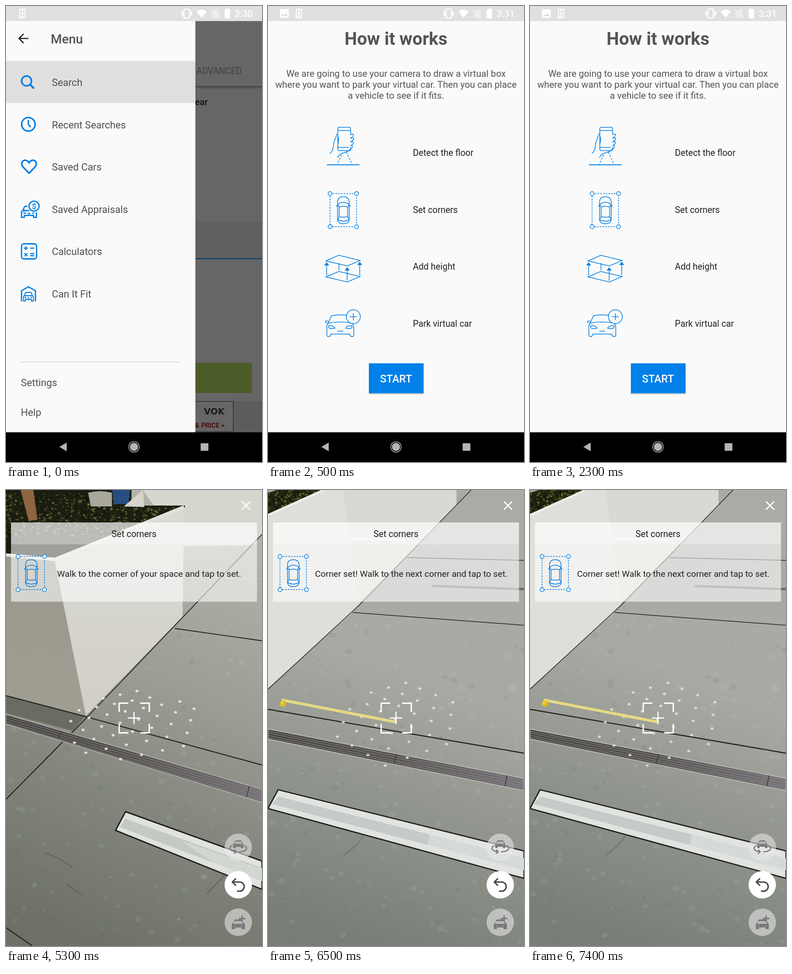
An HTML page for the animation above (8000 ms loop, 561 by 998 pixels).

```html
<!DOCTYPE html>
<html lang="en">
<head>
<meta charset="utf-8">
<title>Can It Fit</title>
<style>
html, body { margin: 0; height: 100%; overflow: hidden; background: #fafafa; }
svg { display: block; width: 100vw; height: 100vh; font-family: Roboto, sans-serif; }
.scene { display: none; }
.line { fill: none; stroke: #007ee5; }
.menu { font-size: 21.8px; fill: #505050; }
.body { font-size: 20.26px; fill: #555; text-anchor: middle; }
.step { font-size: 19.4px; fill: #222; }
.mid { text-anchor: middle; }
.clock { font-size: 20.2px; font-weight: 500; fill: #fff; }
.joint { fill: none; stroke: #22231f; }
</style>
</head>
<body>
<svg viewBox="0 0 561 998">
<defs>
  <linearGradient id="floorA" x1=".6" y1="0" x2=".35" y2="1">
    <stop offset="0" stop-color="#b3b4ac"/><stop offset=".4" stop-color="#9b9d94"/>
    <stop offset=".65" stop-color="#84887e"/><stop offset="1" stop-color="#6d7168"/>
  </linearGradient>
  <linearGradient id="floorB" x1=".6" y1="0" x2=".4" y2="1">
    <stop offset="0" stop-color="#a9aba5"/><stop offset=".4" stop-color="#a7aaa2"/>
    <stop offset=".65" stop-color="#939790"/><stop offset="1" stop-color="#787e76"/>
  </linearGradient>
  <linearGradient id="wall" x1="0" y1="0" x2="0" y2="1">
    <stop offset="0" stop-color="#dbdad4"/><stop offset="1" stop-color="#d0cec7"/>
  </linearGradient>
  <linearGradient id="shadedWall" x1="0" y1="0" x2="0" y2="1">
    <stop offset="0" stop-color="#9a988d"/><stop offset="1" stop-color="#a09e92"/>
  </linearGradient>
  <linearGradient id="grate">
    <stop offset="0" stop-color="#474543"/><stop offset=".45" stop-color="#54514f"/><stop offset="1" stop-color="#77737a"/>
  </linearGradient>
  <linearGradient id="shade" x1="0" y1="0" x2="0" y2="1">
    <stop offset="0" stop-color="#444"/><stop offset="1" stop-color="#666"/>
  </linearGradient>
  <clipPath id="hedgeA"><path d="M0 0H275V34L392 34V38L107 148L0 139Z"/></clipPath>
  <clipPath id="hedgeB"><path d="M0 6L20 0H119L0 54Z"/></clipPath>
  <clipPath id="page"><path d="M415 33H561V933H415Z"/></clipPath>

  <path id="car" d="M4 10L7 3Q8 1 10 1H24Q26 1 27 3L30 10Q33 11 33 14V24H27V20H7V24H1V14Q1 11 4 10H30M5 14l5 2M29 14l-5 2M14 16H20"/>

  <path id="download" d="M31 6H41Q43 6 43 8V25Q43 27 41 27H31Q29 27 29 25V8Q29 6 31 6ZM31 9V24H41V9ZM34.7 10.5H37.3V15.5H40L36 20L32 15.5H34.7ZM32 21.5H40V23H32Z" fill="#fff" fill-rule="evenodd"/>

  <g id="system">
    <path d="M0 0H561V33H0Z" fill="#e0e0e0"/>
    <g fill="none" stroke="#fff" stroke-width="2">
      <rect x="390" y="7" width="12" height="19" rx="2" stroke-width="2.4"/>
      <path d="M387 11V22M385 13.500V19.500M405 11V22M407 13.500V19.500"/>
    </g>
    <path d="M417.500 12Q428.500 3.500 440 12L428.700 26Z" fill="#fff"/>
    <path d="M456 8H466V26H450V14Z" fill="#ebebeb"/>
    <path d="M449 8L467 26" stroke="#f4f4f4" stroke-width="1.500"/>
    <path d="M482 7V5.500H488V7H491V27H479V7Z" fill="#fff"/>
    <path d="M0 933H561V998H0Z"/>
    <g fill="#b4b4b4">
      <path d="M117 965L133 955.500V974.500Z"/>
      <circle cx="280.500" cy="965" r="9"/>
      <circle cx="280.500" cy="965" r="11.500" fill="none" stroke="#b4b4b4" stroke-width="1.500"/>
      <rect x="426.500" y="957" width="17" height="16.500" rx="1"/>
    </g>
  </g>

  <g id="corners" class="line" stroke-width="1.500">
    <path d="M136 410.500H194V483H136Z" stroke-dasharray="3.500 2.500"/>
    <path d="M152.500 430Q152 417.500 165 417.500T178 430V465Q178.500 476.500 165 476.500T152.500 465ZM153 434Q165 425 177.500 434L174.500 440Q165 436.500 156 440ZM156 440V461Q165 463.500 174.500 461V440M153 467L156 461M177.500 467L174.500 461M153 468Q165 474 177.500 468M152.500 436L149.500 439M178 436L181 439"/>
    <g fill="#fafafa">
      <circle cx="136" cy="410.500" r="4.300"/><circle cx="194" cy="410.500" r="4.300"/>
      <circle cx="136" cy="483" r="4.300"/><circle cx="194" cy="483" r="4.300"/>
    </g>
  </g>

  <g id="hud">
    <path d="M11 71H550V119H11Z" fill="#fff" opacity=".7"/>
    <path d="M11 119H550V244.500H11Z" fill="#fff" opacity=".58"/>
    <text class="step mid" x="280.500" y="103">Set corners</text>
    <use href="#corners" x="-109.700" y="-265"/>
    <g fill="none" stroke="#fff" stroke-width="2.600">
      <path d="M517 25L535 43M535 25L517 43"/>
      <path d="M248 486V466.500H268M294 466.500H314V486M314 512V531.500H294M268 531.500H248V512" stroke-width="3"/>
      <path d="M267 499H294M280.500 485.500V512.500"/>
    </g>
    <g fill="#e8e8e8" fill-opacity=".58">
      <circle cx="509" cy="782" r="30"/><circle cx="509" cy="946" r="30"/>
    </g>
    <circle cx="509" cy="864" r="30" fill="#fff"/>
    <path d="M504 850L496 858L504 866M497 858H512A10 10 0 0 1 512 878H506" fill="none" stroke="#444" stroke-width="3"/>
    <g fill="none" stroke="#777" stroke-width="2.400">
      <path d="M496 778C487 783 490 790 504 791.500M522 778C532 783 528 791 511 792M500 787L504.500 791.500L499.500 796"/>
      <use href="#car" transform="translate(498 767) scale(.65)" fill="#777"/>
      <use href="#car" transform="translate(495 940) scale(.83)" fill="#777"/>
      <path d="M510 938H525M517.500 931V945" stroke-width="2.800"/>
    </g>
    <path d="M503 770H515L517 774H501ZM501 944H516L519 949H498ZM501 777L505 778M517 777L513 778M499 953L504 955M518 953L513 955" fill="#b9bab7" stroke="#b9bab7"/>
  </g>
</defs>

<g class="scene">
  <path d="M0 0H561V998H0Z" fill="#666"/>
  <g clip-path="url(#page)">
    <path d="M415 175H561V182H415Z" fill="url(#shade)"/>
    <path d="M415 472H561V552H415Z" fill="#606060"/>
    <path d="M415 553H561" stroke="#05396a" stroke-width="2"/>
    <rect x="300" y="781" width="239" height="66" rx="5" fill="#4b5c28"/>
    <path d="M415 865H561V933H415Z" fill="#5c5c5c"/>
    <path d="M400 865.500H498V931.500H400" fill="#666" stroke="#303030" stroke-width="1.500"/>
    <text x="417.500" y="149" font-size="19.300" fill="#414141">ADVANCED</text>
    <text x="442" y="217" font-size="19.500" font-weight="700" fill="#202020" text-anchor="end">Year</text>
    <text x="479" y="894" font-size="19" font-weight="700" fill="#1c1c1c" text-anchor="end" font-family="DejaVu Sans, sans-serif">VOK</text>
    <text x="479" y="923" font-size="14.500" font-weight="700" fill="#471313" text-anchor="end">&amp; PRICE &gt;</text>
  </g>
  <use href="#system"/><use href="#download"/>
  <text class="clock" x="501" y="24">3:30</text>
  <path d="M0 33H415V933H0Z" fill="#fafafa"/>
  <path d="M0 120.500H415V212.500H0Z" fill="#e0dfde"/>
  <path d="M49 71H29M38.500 61L28.500 71L38.500 81" fill="none" stroke="#222" stroke-width="2.600"/>
  <text x="98" y="81.500" font-size="28" font-weight="500" fill="#555">Menu</text>
  <g class="menu" id="menu"></g>
  <path d="M33 779H382" stroke="#d8d8d8" stroke-width="1.500"/>
  <g class="menu"><text x="32.500" y="832">Settings</text><text x="32.500" y="897">Help</text></g>
  <g class="line" stroke-width="3">
    <circle cx="45" cy="164" r="10.800" stroke-width="3.500"/><path d="M52.500 171.500L61.500 180.500" stroke-width="4"/>
    <circle cx="49" cy="259" r="14.800" stroke-width="3.300"/><path d="M49 249.500V259L54 265"/>
    <path d="M50.500 366L38 353Q32 346 36 340.500C41 335 48 338 50.500 343C53 338 60 335 65 340.500Q69 346 63 353Z" stroke-width="3.400"/>
    <use href="#car" transform="translate(33 437) scale(1.020 1.070)" stroke-width="2.700"/>
    <circle cx="61.500" cy="438" r="11" fill="#fafafa" stroke="#fafafa" stroke-width="7"/>
    <circle cx="61.500" cy="438" r="11" stroke-width="2.700"/>
    <rect x="34" y="520.500" width="33" height="33" rx="5" stroke-width="2.800"/>
    <path d="M39 530H48M43.500 525.500V534.500M53 530H62M40.500 541L47 547.500M47 541L40.500 547.500M53 542H62M53 546.500H62" stroke-width="2.300"/>
    <path d="M34 646.500V623L49 614.500L64.500 623V646.500" stroke-width="2.800"/>
    <use href="#car" transform="translate(37.500 626) scale(.680 .820)" stroke-width="2.700"/>
  </g>
  <text class="mid" x="61.500" y="444" font-size="17" font-weight="500" fill="#007ee5">$</text>
</g>

<g class="scene">
  <path d="M0 0H561V998H0Z" fill="#fafafa"/>
  <use href="#system"/><use href="#download" x="32"/>
  <path d="M28 7H43Q45.500 7 45.500 9V24Q45.500 26 43 26H28Q26 26 26 24V9Q26 7 28 7ZM28.500 22.500H43.500L38.500 15.500L34.500 20.500L32 17.500Z" fill="#fff" fill-rule="evenodd"/>
  <text class="clock" x="501" y="24">3:31</text>
  <text class="mid" x="280.500" y="85" font-size="38.700" font-weight="700" fill="#555">How it works</text>
  <g class="body">
    <text x="280.500" y="154.500">We are going to use your camera to draw a virtual box</text>
    <text x="280.500" y="178.500">where you want to park your virtual car. Then you can place</text>
    <text x="280.500" y="202.500">a vehicle to see if it fits.</text>
  </g>
  <g class="step" id="steps"></g>
  <g class="line" stroke-width="1.500">
    <path d="M129 347.500H200.500" stroke-width="1.800"/>
    <path d="M153 313V268.500Q153 265.500 156 265.500H178Q181 265.500 181 268.500V281M181 309V313Q181 316.500 178 316.500H156Q153 316.500 153 313M153 272.500H181M153 309.500H177"/>
    <path d="M135.500 323Q143 317 143.500 305Q144 297 148 289L151 281Q152 279 153 279M154 286Q156 294 153 302M152 332Q156 323 167 321Q178 318 182 312M181 282Q186 278 187.500 282Q187 286 181 289M181 290Q186 287 188 290Q187 295 181 297M181 298Q186 295 187 299Q186 304 181 306M181 306Q185 304 185 308Q184 312 179 314"/>
    <path d="M161 326L152 346M172 320L184 346" stroke-dasharray="4 3"/>
    <use href="#corners"/>
    <path d="M127 558L155 545.500L202 557L174 569ZM127 593L155 581L202 592L174 604ZM155.500 563V578M128.500 590V565M173.500 601V576M201 589V564"/>
    <path d="M124.500 567L128.500 562L132.500 567ZM169.500 578L173.500 573L177.500 578ZM197 566L201 561L205 566Z" fill="#007ee5"/>
    <path d="M132 694L138 680Q140 677 144 677Q158 675 174 677M132 694Q158 689 184 694M132 694Q128 698 129 706V720Q129 723.500 133 723.500Q137 723.500 138 718H179Q180 723.500 184 723.500Q188 723.500 188 720V706Q188 698 184 694M132 694Q125 694 126 690Q130 688 133 691M132.500 700Q142 698 147 705Q137 708 133 704ZM184 700Q175 698 170 705Q180 708 184 704ZM152 711.500H165"/>
    <circle cx="187" cy="680" r="15.300" fill="#fafafa"/>
    <path d="M179.500 680H194.500M187 672.500V687.500"/>
  </g>
  <path d="M221 785H341V850H221Z" fill="#bbb" opacity=".7"/>
  <path d="M221 782H341V847.500H221Z" fill="#0080e8"/>
  <text class="mid" x="280.500" y="823.500" font-size="23.200" font-weight="500" fill="#fff">START</text>
</g>

<g class="scene">
  <path d="M0 0H561V998H0Z" fill="url(#floorA)"/>
  <g id="spotsA"></g>
  <path d="M300 0H561V97L538 121L385 123Z" fill="#d6d5ce"/>
  <path d="M389 143L467 148M389 190L561 195" stroke="#b9b9b3" stroke-width="2"/>
  <path class="joint" d="M561 97L178 497M370 303L561 330" stroke-width="1.800"/>
  <path d="M0 449L175 494L146 527L0 488Z" fill="#6b6c61"/>
  <g clip-path="url(#hedgeA)">
    <path d="M0 0H400V150H0Z" fill="#1b1d11"/>
    <g id="leavesA"></g>
    <path d="M32 0H60L69 65L50 68Z" fill="#8f6540"/>
  </g>
  <path d="M180 6Q206 -1 232 6V36H186Z" fill="#aaa79d"/><path d="M233 0H272L268 31H236Z" fill="#264e80"/>
  <path d="M258 36L300 0L303 37Z" fill="#d6d4cc"/>
  <path d="M0 142L107 156L175 494L0 449Z" fill="url(#shadedWall)"/>
  <path d="M107 156L390 36L387 277L175 494Z" fill="url(#wall)"/>
  <path d="M0 142L107 152L390 37" fill="none" stroke="#e3e1da" stroke-width="7"/>
  <path class="joint" d="M0 450L178 497L561 602M178 497L0 677M0 958L58 998" stroke-width="2.200"/>
  <path d="M0 491L561 655V684L0 512Z" fill="url(#grate)" stroke="#b1b0a9" stroke-width="1.800"/>
  <path d="M0 496L561 661M0 501L561 667M0 506L561 673M0 510L561 679" stroke="#8b8783" stroke-width="1"/>
  <path d="M122 530L114 544M533 648L527 672" stroke="#333" stroke-width="1.500"/>
  <path d="M262 704L561 812V874L240 745Z" fill="#dfe2de" stroke="#20211d" stroke-width="3"/>
  <path d="M261 719L561 827V856L250 738Z" fill="#c4c9c2"/>
  <path d="M380 766L561 829V856L460 818Z" fill="#d3d7d2"/>
  <path d="M86 794Q115 804 146 826M131 862L168 888M482 840L440 884" fill="none" stroke="#54574a" stroke-width="2" opacity=".7"/>
  <g id="dotsA" fill="#eeeeea" opacity=".85"></g>
  <use href="#hud"/>
  <text class="step mid" x="313.500" y="189.500" style="font-size:19.25px">Walk to the corner of your space and tap to set.</text>
</g>

<g class="scene">
  <path d="M0 0H561V998H0Z" fill="url(#floorB)"/>
  <g id="spotsB"></g>
  <path d="M165 0H413V35L203 245Z" fill="#d9d9d3"/>
  <path d="M0 54L120 0H165L203 245L185 268L0 434Z" fill="#dededa"/>
  <g clip-path="url(#hedgeB)"><path d="M0 0H120V55H0Z" fill="#1c2110"/><g id="leavesB"></g></g>
  <path d="M0 55L120 1" stroke="#eeeeea" stroke-width="5"/>
  <path class="joint" d="M445 0L203 249L0 436M185 268L561 296M305 148L561 154" stroke-width="1.500"/>
  <path d="M360 210L561 217" stroke="#6c6c69" stroke-width="5"/>
  <path d="M180 106L300 109" stroke="#eee" stroke-width="4"/>
  <path class="joint" d="M0 480L561 576" stroke-width="2.300"/>
  <path d="M0 523L561 631V658L0 545Z" fill="url(#grate)" stroke="#bbbbb5" stroke-width="1.800"/>
  <path d="M0 528L561 636M0 532L561 642M0 537L561 648M0 541L561 653" stroke="#918f8b" stroke-width="1"/>
  <path d="M282 578L276 599M524 625L519 648" stroke="#333" stroke-width="1.500"/>
  <path d="M22 656L561 790V850L0 697Z" fill="#e0e3e0" stroke="#20211d" stroke-width="2.800"/>
  <path d="M23 671L355 754L350 777L8 687Z" fill="#c5cbc6"/>
  <path d="M355 754L561 806V832L350 777Z" fill="#d5dad7"/>
  <path d="M208 757Q200 775 165 800" fill="none" stroke="#5a5d55" stroke-width="2" opacity=".6"/>
  <g id="dotsB" fill="#e6e6e2" opacity=".8"></g>
  <path d="M30 459.500L281 508" stroke="#e5da84" stroke-width="6"/>
  <circle cx="33" cy="467.500" r="6.800" fill="#e3bd17"/><circle cx="31" cy="465.500" r="3" fill="#f1d43e"/>
  <use href="#hud"/>
  <text class="step mid" x="314" y="189.500" style="font-size:19.25px">Corner set! Walk to the next corner and tap to set.</text>
</g>
</svg>

<script>
const fill = (id, items, draw) =>
  document.getElementById(id).innerHTML = items.map(draw).join('');

const column = (id, x, y, step, labels) =>
  fill(id, labels, (label, i) => `<text x="${x}" y="${y + i * step}">${label}</text>`);

column('menu', 100.5, 175, 92.6,
  ['Search', 'Recent Searches', 'Saved Cars', 'Saved Appraisals', 'Calculators', 'Can It Fit']);
column('steps', 317.5, 328, 124.6,
  ['Detect the floor', 'Set corners', 'Add height', 'Park virtual car']);

function random(seed) {
  return () => (seed = seed * 16807 % 2147483647) / 2147483647;
}

// Scatter soft blobs over a box.
function scatter(id, seed, count, [x, y, w, h], size, colors, opacity) {
  const rnd = random(seed);
  fill(id, Array(count).fill(0), () => {
    const r = size * (.3 + rnd());
    return `<ellipse cx="${x + rnd() * w}" cy="${y + rnd() * h}" rx="${r}" ry="${r * .8}"
      fill="${colors[Math.floor(rnd() * colors.length)]}" opacity="${opacity}"/>`;
  });
}
const leaves = ['#2c3515', '#4c5826', '#6b763a', '#10120a'];
const stains = ['#d6d8d0', '#d6d8d0', '#d6d8d0', '#5c6056'];
scatter('leavesA', 71, 1100, [0, 8, 392, 95], 2.4, leaves, .8);
scatter('leavesB', 23, 300, [0, 0, 120, 55], 2.4, leaves, .9);
scatter('spotsA', 5, 170, [0, 300, 561, 698], 6, stains, .11);
scatter('spotsB', 9, 190, [0, 280, 561, 718], 6, stains, .11);

// Each row of tracked floor points: x, y, count, dx, dy.
const lattice = (id, rows) => fill(id, rows, ([x, y, n, dx, dy]) =>
  Array.from({ length: n }, (_, i) =>
    `<ellipse cx="${x + i * dx}" cy="${y + i * dy}" rx="3.4" ry="2.8"/>`).join(''));

lattice('dotsA', [
  [251, 589, 4, 46, -9.6], [175, 575, 6, 44.4, -8.7], [150, 553, 7, 42.4, -8.2],
  [169, 525, 7, 40.5, -7.7], [142, 506, 7, 39.8, -7.2], [160, 482, 5, 38.8, -7], [213, 456, 3, 37, -8]
]);
lattice('dotsB', [
  [257, 603, 1, 0, 0], [305, 586, 3, 43, -15], [219, 580, 5, 45, -14.5], [184, 559, 6, 43.4, -13.4],
  [152, 540, 7, 42.2, -12.6], [165, 508, 6, 40.5, -11.8], [179, 480, 5, 38.5, -11.3], [226, 443, 3, 38, -10.5]
]);

const scenes = [...document.querySelectorAll('.scene')];
const cuts = [500, 3500, 6500];
const start = performance.now();

function frame(now) {
  const t = Math.max(0, now - start) % 8000;
  const current = cuts.filter(cut => t >= cut).length;
  scenes.forEach((scene, i) => scene.style.display = i === current ? 'inline' : 'none');
  requestAnimationFrame(frame);
}
frame(start);
</script>
</body>
</html>
```
